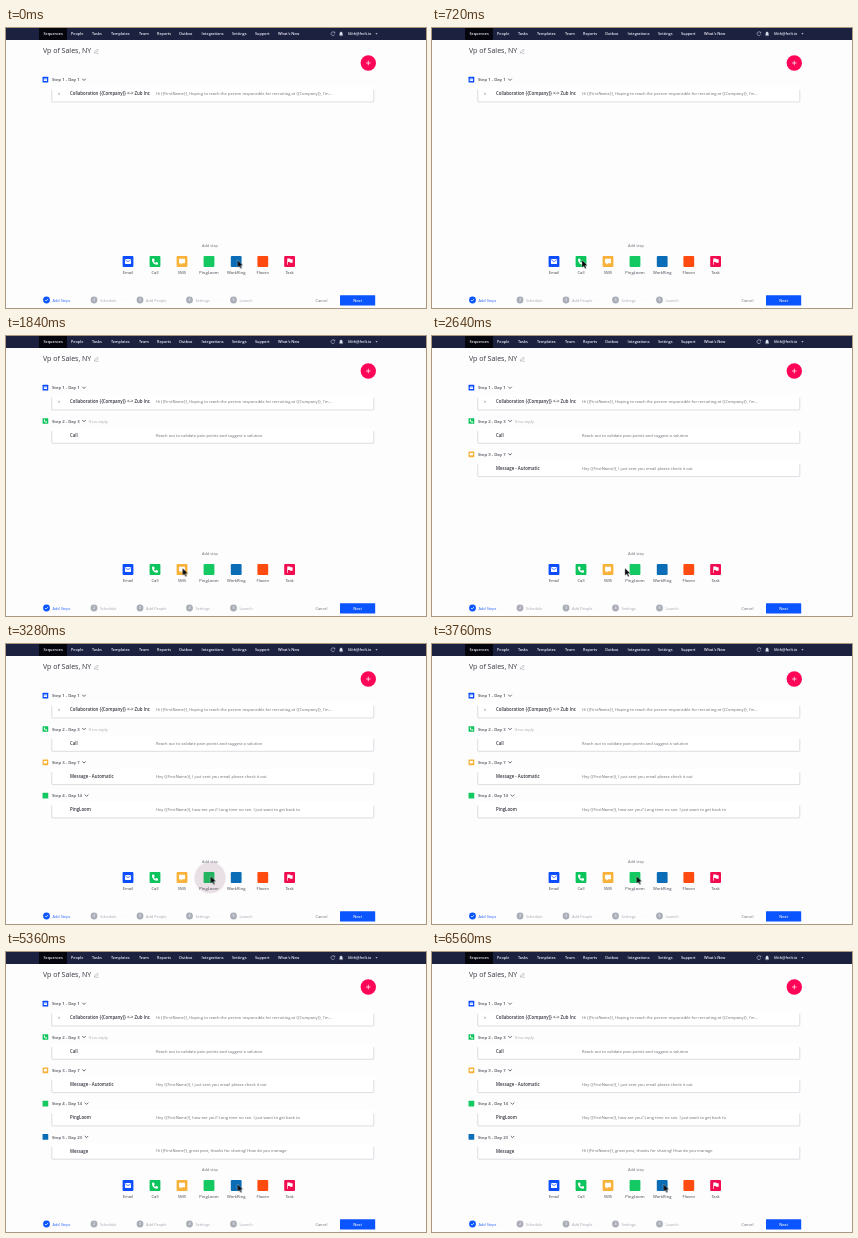
An HTML page that plays this animation: 420x280 px, repeating every 7.2 s.

```html
<!DOCTYPE html>
<html lang="en">
<head>
<meta charset="utf-8">
<title>Sequence builder</title>
<style>
html, body { margin: 0; width: 100%; height: 100%; overflow: hidden; background: #fdfdfe; }
svg { display: block; width: 100vw; height: 100vh; }
text { font: 4.1px "Open Sans", "Noto Sans", sans-serif; fill: #6a6d75; }
.bold { font-size: 4.35px; font-weight: 600; fill: #34363e; }
.head { font-size: 4.25px; font-weight: 600; fill: #484b54; }
.nav { font-size: 3.75px; font-weight: 600; fill: #f1f2f8; }
.title { font-size: 7px; fill: #33363f; }
.label { font-size: 4.15px; fill: #41444c; }
.small { font-size: 3.85px; }
.mute { fill: #a3a7af; }
.active { fill: #2a64ff; }
.mid { text-anchor: middle; }
.line { fill: none; stroke: #4c515c; stroke-width: .85; stroke-linecap: round; stroke-linejoin: round; }

#cursor { animation: travel 7.2s infinite; }
.ripple { opacity: 0; transform-box: fill-box; transform-origin: center; animation: ripple 7.2s infinite; }
.step2 { animation: show2 7.2s linear infinite; }
.step3 { animation: show3 7.2s linear infinite; }
.step4 { animation: show4 7.2s linear infinite; }
.step5 { animation: show5 7.2s linear infinite; }

@keyframes travel {
  0%, 1.11% { transform: translate(231.5px, 232px); animation-timing-function: ease-in-out; }
  7.78%, 17.78% { transform: translate(150px, 232px); animation-timing-function: ease-in-out; }
  23.89%, 33.33% { transform: translate(176.5px, 232px); animation-timing-function: ease-in-out; }
  39.44%, 61.11% { transform: translate(204.5px, 232px); animation-timing-function: ease-in-out; }
  65.56%, 100% { transform: translate(231.5px, 232px); }
}
@keyframes ripple {
  0% { transform: scale(0); opacity: .22; animation-timing-function: ease-out; }
  1.11% { transform: scale(.56); opacity: .22; animation-timing-function: ease-out; }
  3.33% { transform: scale(.95); opacity: .16; animation-timing-function: ease-out; }
  5.56%, 100% { transform: scale(1); opacity: 0; }
}
@keyframes show2 { 0%, 12.22% { opacity: 0; } 15.56%, 100% { opacity: 1; } }
@keyframes show3 { 0%, 27.78% { opacity: 0; } 31.11%, 100% { opacity: 1; } }
@keyframes show4 { 0%, 43.33% { opacity: 0; } 45.56%, 100% { opacity: 1; } }
@keyframes show5 { 0%, 67.78% { opacity: 0; } 71.11%, 100% { opacity: 1; } }
</style>
</head>
<body>
<svg id="stage" viewBox="0 0 420 280" preserveAspectRatio="none"></svg>
<script>
const text = (x, y, s, cls = "") => `<text x="${x}" y="${y}" class="${cls}">${s}</text>`;
const rect = (x, y, w, h, fill, r = 0) =>
  `<rect x="${x}" y="${y}" width="${w}" height="${h}" rx="${r}" fill="${fill}"/>`;
const caret = (x, y) => `<path class="line" d="M${x - 1.5} ${y - .7}l1.5 1.5 1.5-1.5"/>`;

// Tile colour and white glyph, on an 11 x 11 grid
const tiles = {
  email: ["#0b4dff", '<rect x="2.4" y="3" width="6.2" height="5" rx=".5" fill="#fff"/><path d="M2.7 3.7l2.8 2 2.8-2" fill="none" stroke="#0b4dff" stroke-width=".7"/>'],
  call: ["#0bc45c", '<path d="M3.2 2.4l1.5.2.5 1.8-.9.8q.6 1.2 1.6 1.7l.8-.9 1.8.6.2 1.5q-.5 1-1.6.8Q3 8 2.4 4 2.3 2.8 3.2 2.4z" fill="#fff"/>'],
  sms: ["#f8b23a", '<path d="M2.5 2.8h6v4.5H5.7L4 8.8V7.3H2.5z" fill="#fff"/>'],
  chat: ["#14c962", ""],
  social: ["#0b6db5", ""],
  flow: ["#ff4b0f", ""],
  task: ["#f30b50", '<path d="M3.1 2.4h3l.5.8h2v3.5H6l-.5-.8H3.8v3h-.7z" fill="#fff"/>']
};
const tile = (kind, cx, cy, size) => {
  const [color, glyph] = tiles[kind], k = size / 11;
  return `<g transform="translate(${cx - size / 2} ${cy - size / 2}) scale(${k})">${rect(0, 0, 11, 11, color, 1)}${glyph}</g>`;
};

const nav = [["Sequences", 37.5], ["People", 65], ["Tasks", 86], ["Templates", 105], ["Team", 133],
  ["Reports", 151], ["Outbox", 173], ["Integrations", 195.5], ["Settings", 226], ["Support", 249], ["What's New", 272]];

const header = () =>
  rect(0, 35, 420, .4, "#f6f7f9") +
  rect(0, 0, 420, 12, "#1c2140") + rect(33, 0, 28, 12, "#05060d") +
  nav.map(([s, x]) => text(x, 7.2, s, "nav")).join("") +
  '<path d="M328.6 4.8a1.9 1.9 0 1 0 .1 1.6M328.8 3.7v1.2h-1.2" fill="none" stroke="#dfe1ee" stroke-width=".5"/>' +
  '<path d="M333.4 7.2h3.4l-.5-.8V5.2a1.2 1.2 0 0 0-2.4 0v1.2zM334.7 7.9h.8" fill="#dfe1ee" stroke="#dfe1ee" stroke-width=".4"/>' +
  text(342, 7.2, "lilith@frelt.io", "nav") +
  '<path d="M369.4 5.2h2.2l-1.1 1.4z" fill="#dfe1ee"/>' +
  text(37, 25, "Vp of Sales, NY", "title") +
  '<path d="M88.4 25.2l.4-1.6 2.4-2.4 1.1 1.1-2.4 2.4zM90.5 25.5h2" fill="none" stroke="#8b8f99" stroke-width=".5"/>' +
  '<circle cx="362.3" cy="35" r="7.7" fill="#ff0558"/>' +
  '<path d="M360 35h4.6M362.3 32.7v4.6" stroke="#fff" stroke-width=".7"/>';

const steps = [
  ["email", 1, "Collaboration {{Company}} &lt;-&gt; Zub Inc",
    "Hi {{FirstName}}, Hoping to reach the person responsible for recruiting at {{Company}}, I'm..."],
  ["call", 3, "Call", "Reach out to validate pain points and suggest a solution"],
  ["sms", 7, "Message - Automatic", "Hey {{FirstName}}, I just sent you email please check it out"],
  ["chat", 14, "PingLoom", "Hey {{FirstName}}, how are you? Long time no see. I just want to get back to"],
  ["social", 23, "Message", "Hi {{FirstName}}, great post, thanks for sharing! How do you manage"]
];

const step = ([kind, day, name, note], i) =>
  `<g class="step${i + 1}"><g transform="translate(0 ${51.7 + i * 33.3})">` +
  tile(kind, 39.4, 0, 5.7) +
  text(46, 1.6, `Step ${i + 1} - Day ${day}`, "head") + caret(day > 9 ? 80.5 : 78, 0) +
  (i === 1 ? text(82.5, 1.5, "If no-reply", "mute") : "") +
  rect(46, 6.5, 322, 16, "#fff", .8) +
  '<path d="M45.8 10v11.5q0 .8.8.8h320.4q.8 0 .8-.8V10" fill="none" stroke="#c4c7ce" stroke-width=".6"/>' +
  (i ? "" : '<path class="line" d="M52.7 13.3l.8.8-.8.8" opacity=".7"/>') +
  text(64, 15.7, name, "bold") + text(150, 15.6, note) + "</g></g>";

const picks = [["email", "Email", 122], ["call", "Call", 149], ["sms", "SMS", 176], ["chat", "PingLoom", 203],
  ["social", "WorkRing", 230.2], ["flow", "Floxen", 256.8], ["task", "Task", 283.6]];

const picker = () =>
  text(204, 219.3, "Add step", "small mid") +
  picks.map(([kind, s, x]) => tile(kind, x, 233.5, 10.8) + text(x, 245.8, s, "label mid")).join("");

const stages = [["Add Steps", 40.5], ["Schedule", 88], ["Add People", 134], ["Settings", 183.5], ["Launch", 227.5]];

const footer = () =>
  rect(0, 263.5, 420, .4, "#f6f7f9") +
  stages.map(([s, x], i) =>
    `<circle cx="${x}" cy="272" r="3.4" fill="${i ? "#a9adb6" : "#0b55ff"}"/>` +
    (i ? text(x, 273.4, i + 1, "nav mid")
       : '<path d="M39 272l1.1 1.1 2-2.2" fill="none" stroke="#fff" stroke-width=".7"/>') +
    text(x + 6, 273.5, s, i ? "small mute" : "small active")).join("") +
  [67, 113, 163, 207].map(x => rect(x, 271.9, 12, .3, "#eceef1")).join("") +
  text(309.5, 273.6, "Cancel", "small") + rect(334, 267.2, 35.2, 10.4, "#0b55ff", .6) +
  text(351.6, 273.7, "Next", "nav mid");

const clicks = [[150, .8], [176.5, 1.92], [204, 3.04], [231.5, 4.8]];
const ripples = () => clicks.map(([x, t]) =>
  `<circle class="ripple" cx="${x}" cy="233.7" r="16.5" fill="#7c4a62" style="animation-delay:${t}s"/>`).join("");

const pointer = '<path id="cursor" d="M0 0v7.6l1.8-1.6 1.2 2.8 1.3-.6L3.1 5.5h2.4z" fill="#08090c" stroke="#fff" stroke-width=".3"/>';

document.getElementById("stage").innerHTML =
  rect(0, 0, 420, 280, "#fdfdfe") + header() + steps.map(step).join("") +
  picker() + footer() + ripples() + pointer;
</script>
</body>
</html>
```
